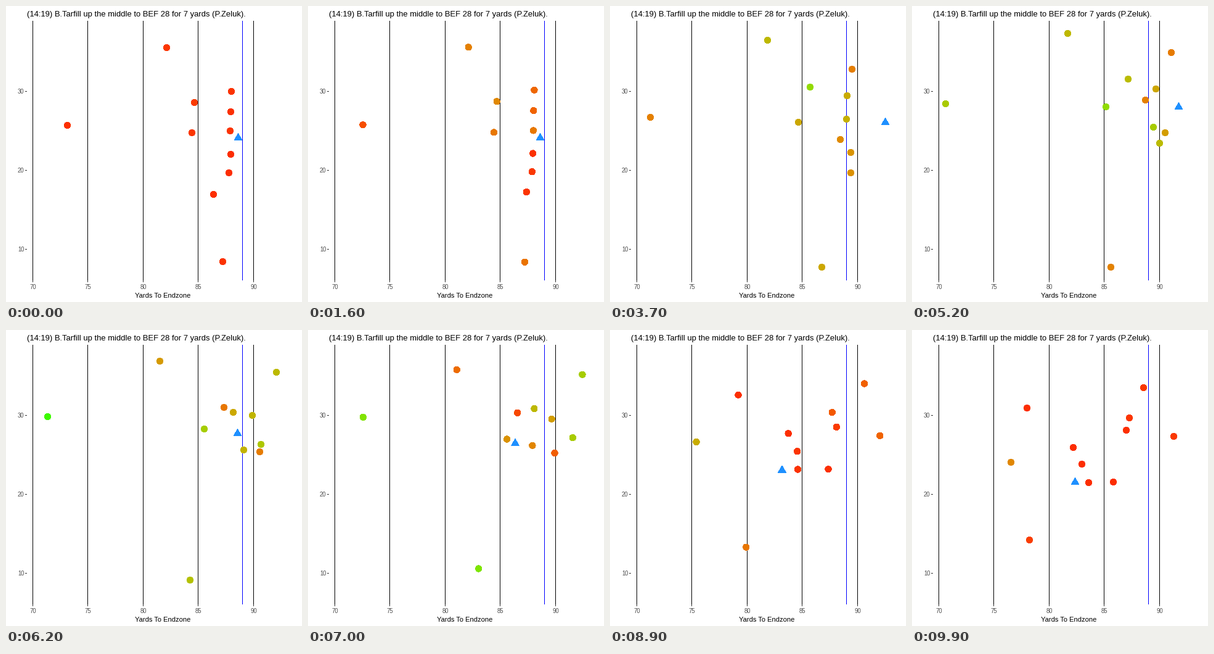
A matplotlib script for the animation above (10000 ms loop, 480 px wide and 480 px high).

```python
import numpy as np
import matplotlib.pyplot as plt
from matplotlib.animation import FuncAnimation
from matplotlib.patches import Polygon, Rectangle

SIZE, FRAMES, STEP = 480, 100, 100
SNAP = 1.1  # seconds until the line starts to move
CHECKPOINTS = [3.7, 5.2, 6.2, 7.9, 9.9]
TIME = np.arange(FRAMES) * STEP / 1000
ARROW = np.array([[0, -6.8], [6.3, 4.2], [-6.3, 4.2]])

plt.rcParams["font.family"] = "Liberation Sans"
fig = plt.figure(figsize=(6, 6), dpi=80, facecolor="white")
ax = fig.add_axes([0, 0, 1, 1])
ax.set(xlim=(0, SIZE), ylim=(SIZE, 0))
ax.axis("off")


def run(points, go=SNAP):
    """Smooth run: stand still until `go`, then pass each checkpoint."""
    t, p = np.array([go] + CHECKPOINTS), np.array(points, float)
    m = np.gradient(p, t, axis=0)
    m[0] = 0
    now = np.maximum(TIME, go)
    k = np.clip(np.searchsorted(t, now, side="right") - 1, 0, len(t) - 2)
    h = (t[k + 1] - t[k])[:, None]
    u = (now - t[k])[:, None] / h
    return (p[k] + u * u * (3 - 2 * u) * (p[k + 1] - p[k])
            + h * u * (1 - u) * ((1 - u) * m[k] - u * m[k + 1])) + 0.5


def effort(bursts):
    """Sum of bell-shaped bursts, each given as (time, strength)."""
    return 0.04 + sum(a * np.exp(-((TIME - t) / 1.1) ** 2 / 2) for t, a in bursts)


def gradient(v):
    """Red to green, blended in CIE Lab."""
    red, green = np.array([53.24, 80.09, 67.20]), np.array([87.73, -86.18, 83.18])
    L, a, b = (red + np.clip(v, 0, 1)[:, None] * (green - red)).T
    fy = (L + 16) / 116
    f = np.array([fy + a / 500, fy, fy - b / 200])
    xyz = np.where(f > 6 / 29, f ** 3, (f - 4 / 29) * 108 / 841)
    xyz *= np.array([[0.9505], [1], [1.089]])
    rgb = np.array([[3.2406, -1.5372, -0.4986],
                    [-0.9689, 1.8758, 0.0415],
                    [0.0557, -0.2040, 1.0570]]) @ xyz
    rgb = np.clip(rgb, 0, 1)
    rgb = np.where(rgb > 0.0031308, 1.055 * rgb ** (1 / 2.4) - 0.055, 12.92 * rgb)
    return np.clip(rgb, 0, 1).T


spots, shades = [], []


def player(points, *bursts, go=SNAP):
    spots.append(run(points, go))
    shades.append(gradient(effort(bursts)))


# secondary
player([(260, 67), (255, 55), (252, 44), (249, 50), (227, 84), (186, 126)],
       (2.9, .5), (5.4, .48))
player([(99, 193), (65, 180), (54, 158), (67, 140), (117, 154), (160, 214)],
       (6.2, .9), (8.9, .42), (3.2, .2), go=0)
player([(351, 414), (343, 423), (322, 423), (298, 405), (250, 366), (190, 340)],
       (3.1, .5), (7.1, .8))
# linebackers
player([(305, 156), (324, 131), (350, 118), (353, 125), (315, 147), (261, 190)],
       (2.7, .45), (4.6, .6))
player([(301, 205), (305, 188), (314, 163), (321, 160), (318, 203), (286, 247)],
       (2.8, .38), (5.6, .75))
player([(336, 305), (390, 270), (401, 222), (413, 185), (443, 172), (424, 172)],
       (4.6, .45), (7, .6), go=0)
# front line
player([(365, 138), (392, 102), (420, 75), (438, 68), (440, 80), (375, 93)],
       (2.9, .3), (6.9, .65))
player([(364, 171), (384, 145), (395, 134), (399, 138), (384, 151), (347, 162)],
       (3.3, .45), (6.2, .5))
player([(363, 202), (383, 183), (378, 152), (368, 133), (366, 127), (352, 142)],
       (3.1, .55), (6.9, .53))
player([(364, 240), (373, 216), (391, 196), (385, 194), (332, 182), (275, 217)],
       (4.9, .5), (6.2, .25))
player([(361, 270), (390, 237), (410, 205), (411, 197), (379, 208), (326, 246)],
       (4.3, .38), (6, .15))
spots, shades = np.array(spots), np.array(shades)

carrier = run([(376, 213), (446, 188), (432, 163), (375, 167), (300, 206), (264, 246)],
              go=1.9)


def bar(x, y, w, h, color):
    ax.add_patch(Rectangle((x, y), w, h, fc=color, lw=0, antialiased=False))


def label(x, y, text, px, color="black", ha="left"):
    ax.text(x, y, text, fontsize=px * 0.9, color=color, ha=ha, va="baseline")


for yard in range(70, 95, 5):
    x = int(43 + (yard - 70) * 17.92)
    bar(x, 24, 1, 421, "black")
    bar(x, 445, 1, 3, "#333333")
    label(x + 0.5, 459, str(yard), 9.5, "#4d4d4d", "center")
bar(383, 24, 1, 421, "blue")  # line of scrimmage
for width in (10, 20, 30):
    y = 522 - 12.8 * width
    bar(31, int(y), 3, 1, "#333333")
    label(29.5, int(y) + 4.5, str(width), 9.5, "#4d4d4d", "right")
label(34, 17, "(14:19) B.Tarfill up the middle to BEF 28 for 7 yards (P.Zeluk).", 13.05)
label(254, 473, "Yards To Endzone", 11.1, ha="center")

dots = ax.scatter(*spots[:, 0].T, s=(10.3 * 0.9) ** 2, c=shades[:, 0],
                  linewidths=0, antialiased=False, zorder=3)
arrow = ax.add_patch(Polygon(carrier[0] + ARROW, fc="#1e90ff", lw=0,
                             antialiased=False, zorder=4))


def draw(i):
    dots.set_offsets(spots[:, i])
    dots.set_facecolors(shades[:, i])
    arrow.set_xy(carrier[i] + ARROW)
    return dots, arrow


anim = FuncAnimation(fig, draw, frames=FRAMES, interval=STEP, repeat=True, repeat_delay=0)
plt.show()
```
